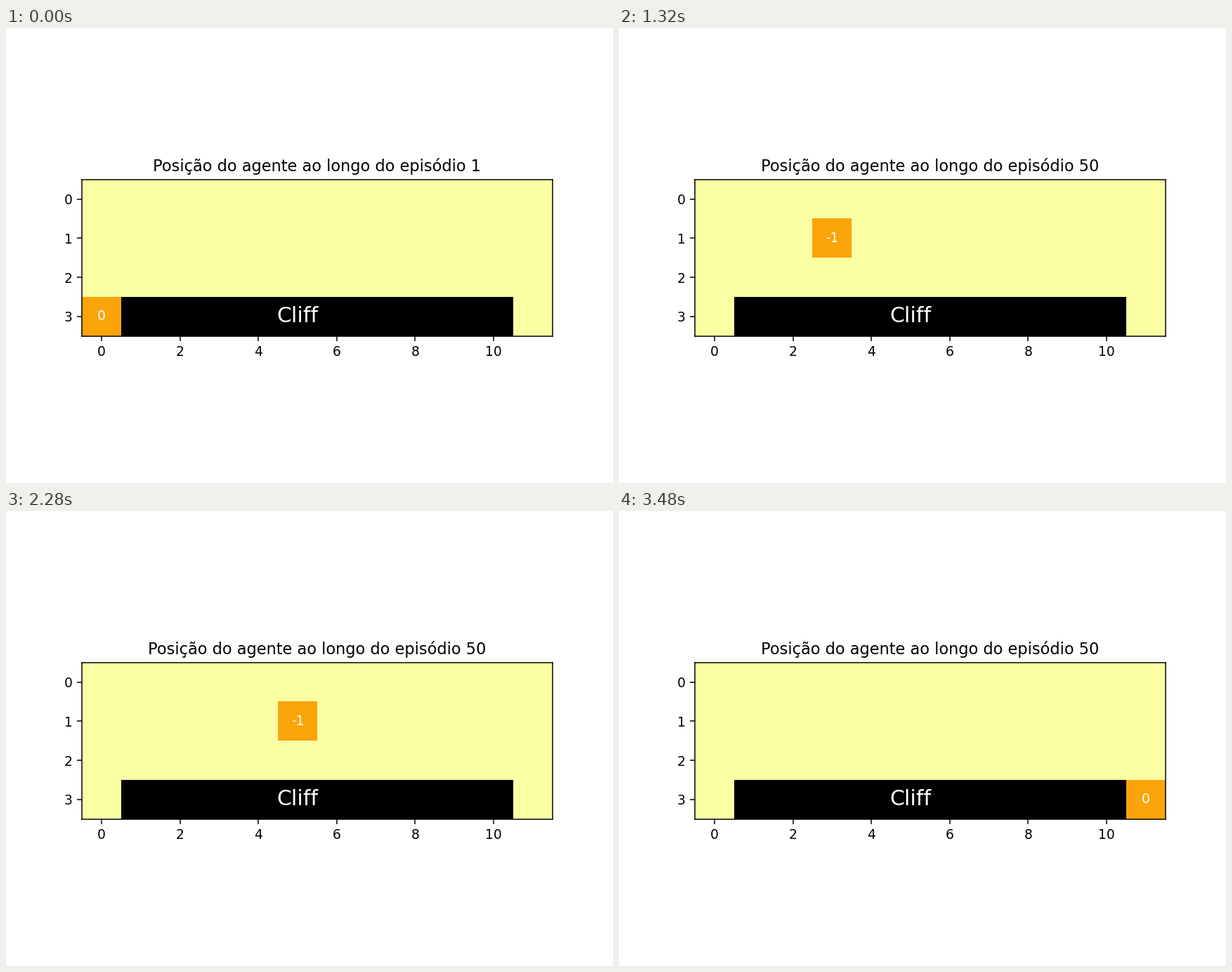
Recreate the animation shown at these times as a matplotlib script. Size 864 px wide and 648 px high, loop 3.6 s.

```python
import numpy as np
import matplotlib.pyplot as plt
from matplotlib.animation import FuncAnimation

ROWS, COLS = 4, 12
START, GOAL = (3, 0), (3, 11)
FREE, AGENT, CLIFF = 1.0, 0.8, 0.0

STEPS = {"U": (-1, 0), "D": (1, 0), "L": (0, -1), "R": (0, 1)}
MOVES = "UUDUDRRRURLRRDRRLULRRRLRRRDRD"


def walk(start, moves):
    cells = [start]
    for move in moves:
        (row, col), (dr, dc) = cells[-1], STEPS[move]
        cells.append((row + dr, col + dc))
    return cells


def grid_with(cell):
    grid = np.full((ROWS, COLS), FREE)
    grid[3, 1:-1] = CLIFF
    grid[cell] = AGENT
    return grid


path = walk(START, MOVES)

plt.rcParams["font.family"] = "DejaVu Sans"
fig, ax = plt.subplots(figsize=(6.4, 4.8), dpi=135)
image = ax.imshow(grid_with(START), cmap="inferno", vmin=0, vmax=1)
title = ax.set_title("")
ax.text(5, 3, "Cliff", color="white", size=16, ha="center", va="center")
reward = ax.text(0, 3, "0", color="white", size=10, ha="center", va="center")


def update(i):
    row, col = cell = path[i]
    image.set_data(grid_with(cell))
    reward.set_position((col, row))
    reward.set_text("0" if cell in (START, GOAL) else "-1")
    episode = 50 if i else 1
    title.set_text(f"Posição do agente ao longo do episódio {episode}")
    return image, reward, title


anim = FuncAnimation(fig, update, frames=len(path), interval=120, repeat=True)
plt.show()
```
